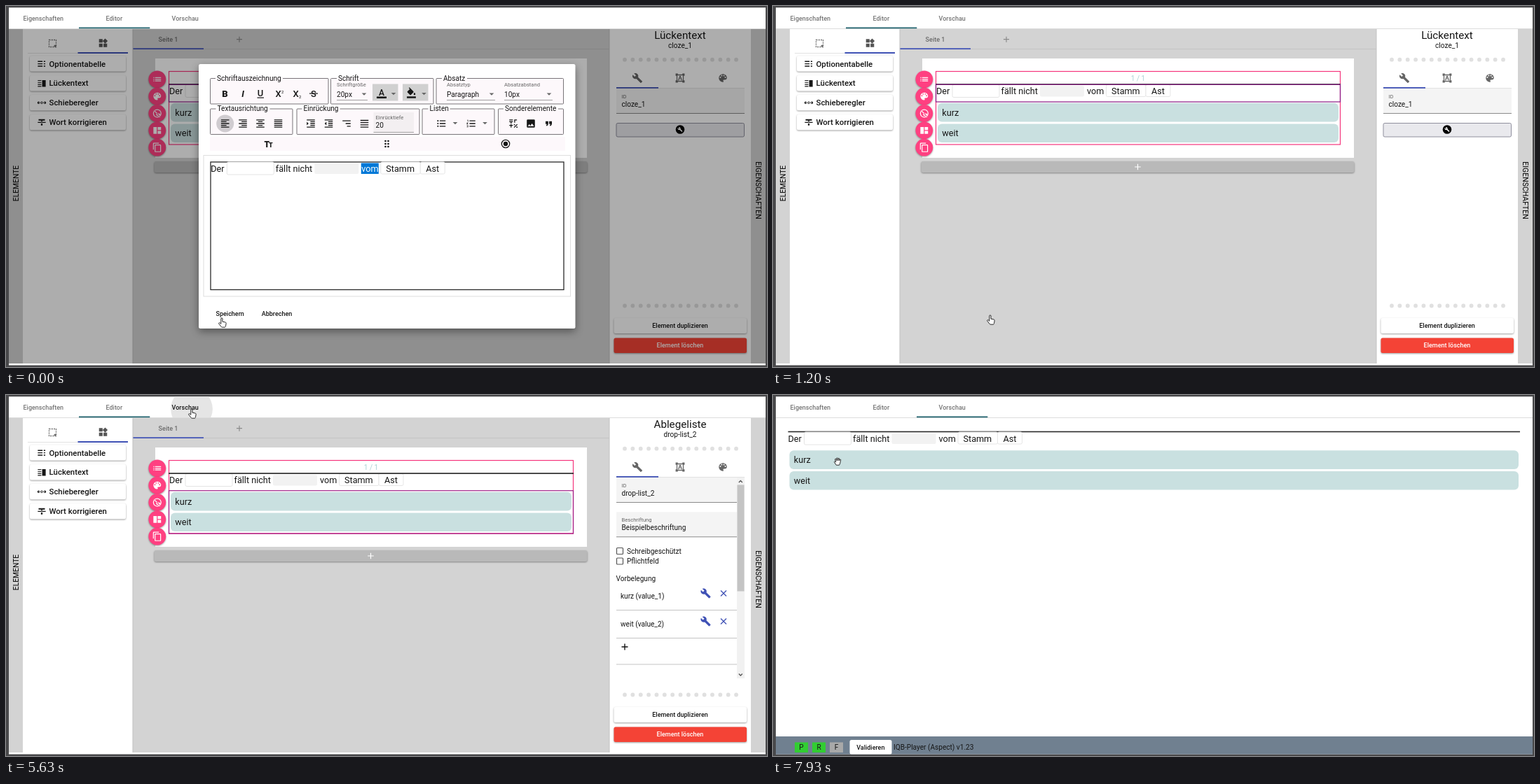
An HTML page that plays this animation: 1086x516 px, repeating every 8 s.

```html
<!DOCTYPE html>
<html lang="de">
<head>
<meta charset="utf-8">
<title>Editor</title>
<style>
html, body { margin: 0; width: 100%; height: 100%; overflow: hidden; background: #48484a; }
svg { display: block; width: 1086px; height: 516px; font-family: Roboto, Arial, sans-serif; }
.soft { filter: drop-shadow(0 1px 1px rgba(0,0,0,.38)); }
.deep { filter: drop-shadow(0 4px 6px rgba(0,0,0,.42)); }
</style>
</head>
<body>
<svg id="stage" viewBox="0 0 1086 516" xmlns="http://www.w3.org/2000/svg"></svg>
<script>
const BLUE = '#3f51b5', PINK = '#ff4081', INK = '#161616', GREY = '#707070';

// ---- drawing helpers ----
const rect = (x, y, x2, y2, fill, extra = '') =>
  `<rect x="${x}" y="${y}" width="${x2 - x}" height="${y2 - y}" fill="${fill}" ${extra}/>`;
const box = (x, y, x2, y2, stroke, width = 1, fill = 'none', r = 0) =>
  rect(x, y, x2, y2, fill, `stroke="${stroke}" stroke-width="${width}" rx="${r}"`);
const text = (x, y, str, size = 10.1, fill = INK, extra = '') =>
  `<text x="${x}" y="${y}" font-size="${size}" fill="${fill}" ${extra}>${str}</text>`;
const MID = 'text-anchor="middle"', BOLD = 'font-weight="500"';
const label = (x, y, str, size = 9, fill = INK, extra = '') =>
  text(x, y, str, size, fill, `${MID} ${BOLD} ${extra}`);
const icon = (x, y, d, fill = INK, size = 15.4) =>
  `<path transform="translate(${x - size / 2} ${y - size / 2}) scale(${size / 24})" d="${d}" fill="${fill}" fill-rule="evenodd"/>`;
const stroke = (d, color = INK, width = 1.2, extra = '') =>
  `<path d="${d}" fill="none" stroke="${color}" stroke-width="${width}" ${extra}/>`;
const dot = (x, y, r, fill, extra = '') => `<circle cx="${x}" cy="${y}" r="${r}" fill="${fill}" ${extra}/>`;
const group = (id, body, extra = '') => `<g id="${id}" ${extra}>${body}</g>`;
const plus = (x, y, r, color, w = 1.2) => stroke(`M${x - r} ${y}h${2 * r}M${x} ${y - r}v${2 * r}`, color, w);
const cross = (x, y, r) => stroke(`M${x - r} ${y - r}l${2 * r} ${2 * r}m0 ${-2 * r}l${-2 * r} ${2 * r}`, BLUE, 1.3);
const arrow = (x, y) => `<path d="M${x - 3.3} ${y - 1.6}h6.6l-3.3 3.4z" fill="#666"/>`;
const bars = rows => rows.map(([x, w], i) => `M${x} ${3 + i * 4}h${w}v2h${-w}z`).join('');

const disc = (x, y, r) => `M${x - r} ${y}a${r} ${r} 0 1 0 ${2 * r} 0a${r} ${r} 0 1 0 ${-2 * r} 0z`;
const FULL = [3, 18];
const shape = {
  wrench: 'M22.7 19l-9.1-9.1c.9-2.3.4-5-1.5-6.9-2-2-5-2.4-7.4-1.3L9 6 6 9 1.6 4.7C.4 7.1.9 10.1 2.9 12.1c1.9 1.9 4.6 2.4 6.9 1.5l9.1 9.1c.4.4 1 .4 1.4 0l2.3-2.3c.5-.4.5-1.1.1-1.4z',
  palette: 'M12 3a9 9 0 0 0 0 18c1.4 0 2-1.5 1.1-2.5-.9-1-.2-2.5 1.1-2.5H16a5 5 0 0 0 5-5c0-4.4-4-8-9-8z'
    + disc(6.5, 10.5, 1.5) + disc(9.5, 6.5, 1.5) + disc(14.5, 6.5, 1.5) + disc(17.5, 10.5, 1.5),
  list: 'M3 9h2V7H3zm0 4h2v-2H3zm0 4h2v-2H3zM7 7v2h14V7zm0 6h14v-2H7zm0 4h14v-2H7z',
  copy: 'M16 1H4a2 2 0 0 0-2 2v14h2V3h12zm3 4H8a2 2 0 0 0-2 2v14a2 2 0 0 0 2 2h11a2 2 0 0 0 2-2V7a2 2 0 0 0-2-2zm0 16H8V7h11z',
  layout: 'M3 4h8v16H3zM13 4h8v7h-8zM13 13h8v7h-8z',
  hidden: disc(12, 12, 10) + disc(12, 12, 8) + 'M5 4l15 15-1.5 1.5L3.500 5.500zM9 15c1-4 9-4 11 0-2 4-10 4-11 0z',
  widgets: 'M13 13v8h8v-8zM3 21h8v-8H3zM3 3v8h8V3zm13.700-1.300L11 7.300 16.700 13l5.600-5.700z',
  options: 'M2 5h12v2.500H2zM2 11h12v2.500H2zM2 17h12v2.500H2zM17 5h4v2.500h-4zM17 11h4v2.500h-4zM17 17h4v2.500h-4z',
  cloze: 'M2 4h9v2H2zM2 9h9v2H2zM2 14h9v2H2zM2 19h9v2H2zM13 4h9v17h-9z',
  slider: disc(4, 12, 3) + disc(12, 12, 3) + disc(20, 12, 3) + 'M4 11h16v2H4z',
  word: 'M4 4h16v3.500H4zM2 11h20v2.500H2zM10 7h4v3h-4zM10 15h4v5h-4z',
  frame: 'M2 2h5v2h10V2h5v5h-2v10h2v5h-5v-2H7v2H2v-5h2V7H2zM6 6v12h12V6zM11 7h2l4 10h-2l-1-2.500h-4L9 17H7zM10.700 13h2.600L12 9.500z',
  left: bars([FULL, [3, 12], FULL, [3, 12], FULL]),
  right: bars([FULL, [9, 12], FULL, [9, 12], FULL]),
  center: bars([FULL, [7, 10], FULL, [7, 10], FULL]),
  justify: bars([FULL, FULL, FULL, FULL, FULL]),
  indent: bars([FULL, [11, 10], [11, 10], [11, 10], FULL]) + 'M3 8v8l4-4z',
  outdent: bars([FULL, [11, 10], [11, 10], [11, 10], FULL]) + 'M7 8v8l-4-4z',
  hanging: 'M3 5h18v2H3zM10 11h11v2H10zM13 17h8v2h-8z',
  even: 'M3 4h18v2H3zM3 9h18v2H3zM3 14h18v2H3zM3 19h18v2H3z',
  bullets: disc(4, 6, 1.600) + disc(4, 12, 1.600) + disc(4, 18, 1.600) + 'M8 5h13v2H8zM8 11h13v2H8zM8 17h13v2H8z',
  numbers: 'M3 4h2v4H4V5H3zM2 10h3v1l-2 2h2v1H2zM2 16h3v4H2v-1h2v-2H2zM8 5h13v2H8zM8 11h13v2H8zM8 17h13v2H8z',
  symbols: 'M3 3h8v2H3zM3 7h8v2H8v3H6V9H3zM14 3h6v2h-4v5h-2zM20 13l1.500 1.500-7 7L13 20zM3 15h3v-2h2v2h3v2H8v4H6v-4H3z' + disc(14.500, 14.500, 1.500) + disc(20, 20, 1.500),
  image: 'M5 3h14a2 2 0 0 1 2 2v14a2 2 0 0 1-2 2H5a2 2 0 0 1-2-2V5a2 2 0 0 1 2-2zm3.500 10.500L5 18h14l-4.500-6-3.500 4.500z',
  quote: 'M6 17h3l2-4V7H5v6h3zm8 0h3l2-4V7h-6v6h3z',
  bucket: 'M16.500 9L7.600 0 6.200 1.400l2.400 2.400L3.400 9c-.6.600-.6 1.500 0 2.100l5.500 5.500c.600.600 1.500.600 2.100 0l5.500-5.500c.600-.600.600-1.500 0-2.100zM19 11.500s-2 2.200-2 3.500a2 2 0 0 0 4 0c0-1.300-2-3.500-2-3.500zM2 20h20v4H2z'
};

// ---- repeated parts ----
const sentence = (dx, dy, selected) => `<g transform="translate(${dx} ${dy})">`
  + box(256, 112.5, 323, 130.5, '#e4e4e4', 1, '#fff', 2) + rect(381, 114, 444, 129.5, '#f2f2f2', 'rx="2"')
  + box(475.5, 112.5, 532, 129.5, '#e6e6e6', 1, '#fff', 2) + box(532, 112.5, 567, 129.5, '#e6e6e6', 1, '#fff', 2)
  + (selected ? rect(447.5, 114, 472.5, 129.5, '#0078d7') : '')
  + text(233, 126, 'Der', 12.65) + text(325.5, 126, 'fällt nicht', 12.65)
  + text(448, 126, 'vom', 12.65, selected ? '#fff' : INK)
  + text(483, 126, 'Stamm', 12.65) + text(540, 126, 'Ast', 12.65) + '</g>';

const words = (x, x2, y) => ['kurz', 'weit'].map((w, i) =>
  rect(x, y + i * 29.6, x2, y + 26.7 + i * 29.6, '#c9e0e0', 'rx="6"') + text(x + 6.3, y + 17.7 + i * 29.6, w, 12.65)).join('');

const dots = y => Array.from({ length: 15 }, (_, i) => dot(883 + i * 11.36, y, 2.9, '#e0e0e0')).join('');

const field = (y, x2, name, value) => rect(871, y, x2, y + 35.5, '#f4f4f4') + rect(871, y + 35, x2, y + 36, '#8a8a8a')
  + text(878.5, y + 13.5, name, 7.6, '#666') + text(878.5, y + 26, value);

const check = (y, name) => box(871.5, y - 4.5, 880.5, y + 4.5, '#555', 1.2, '#fff', 1) + text(886, y + 3.6, name);

const entry = (y, name) => text(877, y + 4, name) + icon(998.5, y - 3.5, shape.wrench, BLUE) + cross(1024, y - 3.5, 4)
  + rect(871, y + 20, 1043, y + 21, '#c4c4c4');

const fieldset = (x, x2, y, name, width, lx) => box(x, y, x2, y + 36.5, '#6a666a', .9, '#fdf8fb', 1)
  + rect(lx - 2, y - 2, lx + width + 2, y + 2, '#fefbfd') + text(lx, y + 3.2, name);

const select = (x, x2, name, value) => text(x, 115, name, 7.6, '#666') + text(x, 130, value)
  + arrow(x2 - 5, 126) + rect(x, 134, x2, 134.8, '#8a8a8a');

// ---- scenes ----
const leftPanel = rect(24, 33, 181, 511, '#fff')
  + rect(31, 67, 174, 68, '#e2e2e2') + rect(102.500, 66, 174, 68, BLUE)
  + stroke('M61.500 48.500h10v10h-10z', GREY, 1.300, 'stroke-dasharray="2 1.300"') + dot(70, 57, 1.600, GREY)
  + icon(138.500, 53, shape.widgets, '#555')
  + [['Optionentabelle', 'options'], ['Lückentext', 'cloze'], ['Schieberegler', 'slider'], ['Wort korrigieren', 'word']].map(([name, ic], i) => {
    const y = 82.5 + i * 27.9;
    return rect(34, y - 11.300, 171, y + 11, '#fff', 'rx="2.500" class="soft"') + icon(51, y, shape[ic], INK, 13.500)
      + text(61.500, y + 4, name, 11.400, INK, BOLD);
  }).join('');

const canvasArea = rect(181, 33, 861, 511, '#d3d3d3') + rect(181, 61, 861, 62, '#c4c4c4') + rect(181, 60.3, 282, 62, BLUE)
  + label(231.5, 50.5, 'Seite 1', 9, '#6a6a6a') + plus(333, 47.700, 4, '#8a8a8a')
  + rect(213, 75, 829, 217, '#fff')
  + rect(211.500, 222, 829.500, 238, '#b9b9b9', 'rx="3" class="soft"') + plus(520.500, 230, 4.300, '#fff')
  + label(521, 106.500, '1 / 1', 10.100, '#a9d0d4', 'style="font-weight:400"')
  + sentence(0, 0) + words(235, 807, 138.8)
  + box(232.5, 93.5, 809.5, 198, '#f5357c', 1.2) + rect(232, 111.3, 810, 112.8, '#111')
  + group('pickText', box(232.500, 112.300, 809.500, 137, '#8a1a86', 1.200))
  + group('pickList', box(232.500, 136.700, 809.500, 198, '#a01f88', 1.200))
  + ['list', 'palette', 'hidden', 'layout', 'copy'].map((name, i) =>
    dot(215.800, 104.800 + i * 24.350, 12.400, PINK, 'class="soft"') + icon(215.800, 104.800 + i * 24.350, shape[name], '#fff', 14.500)).join('');

const panelText = label(962, 47, 'Lückentext', 15.200, INK, 'style="font-weight:400"') + text(962, 59.500, 'cloze_1', 10.100, INK, MID)
  + field(118, 1054, 'ID', 'cloze_1') + box(871, 167.500, 1053.500, 187, '#8f8f9d', 1, '#e9e9ed', 2)
  + dot(962, 176.500, 6.300, '#000') + icon(962, 176.500, shape.wrench, '#fff', 7.500);

const panelList = label(962, 47, 'Ablegeliste', 15.200, INK, 'style="font-weight:400"') + text(962, 59.500, 'drop-list_2', 10.100, INK, MID)
  + field(118, 1043, 'ID', 'drop-list_2') + field(167.3, 1043, 'Beschriftung', 'Beispielbeschriftung')
  + check(223, 'Schreibgeschützt') + check(237.500, 'Pflichtfeld') + text(870.500, 266, 'Vorbelegung')
  + entry(287, 'kurz (value_1)') + entry(327, 'weit (value_2)') + plus(883, 360, 4.500, INK, 1.400)
  + rect(871, 384.5, 1043, 385.5, '#c4c4c4')
  + rect(1043, 118, 1054, 405, '#f1f1f1') + rect(1043.500, 128.500, 1053.500, 280.500, '#c4c4c4')
  + stroke('M1045.800 125l2.500-2.500 2.500 2.500M1045.800 398.500l2.500 2.500 2.500-2.500', '#555', 1.300);

const rightPanel = rect(861, 33, 1063, 511, '#fff') + dots(76.7) + dots(428.5)
  + icon(901, 103, shape.wrench, '#666') + icon(962, 103, shape.frame, '#666') + icon(1023, 103, shape.palette, '#666')
  + rect(871, 117, 1054, 118, '#e2e2e2')
  + group('panelText', panelText) + group('panelList', panelList) + rect(871, 116, 931, 117.800, BLUE)
  + rect(867.500, 446, 1057, 468, '#fff', 'rx="2.500" class="soft"') + label(962, 460.300, 'Element duplizieren')
  + rect(867.500, 474.500, 1057, 496, '#f44336', 'rx="2.500" class="soft"') + label(962, 488.300, 'Element löschen', 9, '#fff');

const editor = rect(4, 33, 1084, 511, '#d3d3d3')
  + canvasArea + leftPanel + rightPanel
  + rect(180.500, 33, 181.500, 511, '#c2c2c2') + rect(860.500, 33, 861.500, 511, '#c2c2c2')
  + text(0, 0, 'ELEMENTE', 10.300, '#000', `${MID} transform="translate(17.500 253.500) rotate(-90)"`)
  + text(0, 0, 'EIGENSCHAFTEN', 10.500, '#000', `${MID} transform="translate(1070 263.500) rotate(90)"`);

const glyph = (x, y, str, extra) => text(x, y, str, 13, INK, `${MID} ${extra}`);
const dialog = rect(275, 83, 812.500, 461, '#fff', 'rx="2.500" class="deep"')
  + fieldset(291.5, 460, 103.500, 'Schriftauszeichnung', 92, 301) + fieldset(463.500, 610, 103.500, 'Schrift', 29, 474)
  + fieldset(614, 795.500, 103.500, 'Absatz', 32, 624)
  + fieldset(291.5, 409, 147, 'Textausrichtung', 73, 301.5) + fieldset(415, 590, 147, 'Einrückung', 50, 424.500)
  + fieldset(594, 697, 147, 'Listen', 27, 604.500) + fieldset(702.500, 795.500, 147, 'Sonderelemente', 74, 712)
  + glyph(312.500, 129.500, 'B', 'font-weight="800"') + glyph(338, 129.500, 'I', 'font-weight="700" font-style="italic"')
  + glyph(363, 128.500, 'U', BOLD) + rect(358.500, 130.500, 368, 131.700, INK)
  + glyph(388.500, 129.500, 'X', BOLD) + text(393, 125, '2', 6) + glyph(413.500, 129.500, 'X', BOLD) + text(418, 131.500, '2', 6)
  + glyph(439, 129.500, 'S', BOLD) + rect(433, 124.500, 445, 125.700, INK)
  + select(472, 516, 'Schriftgröße', '20px') + select(629, 698, 'Absatztyp', 'Paragraph') + select(711, 780, 'Absatzabstand', '10px')
  + rect(523, 111.500, 559.500, 135.500, '#d0d0d0') + rect(566, 111.500, 602.500, 135.500, '#d0d0d0')
  + label(536, 127.500, 'A', 12) + rect(529, 129.500, 543, 132, '#000') + arrow(553, 125.500)
  + icon(578.500, 124, shape.bucket) + arrow(596.500, 125.500)
  + dot(312.700, 168, 12.500, '#d0ccd0')
  + [['left', 312.700], ['right', 338], ['center', 363], ['justify', 388.500], ['indent', 435], ['outdent', 460.500], ['hanging', 486],
    ['even', 511.500], ['bullets', 621.500], ['numbers', 664], ['symbols', 724], ['image', 749], ['quote', 774.500]]
    .map(([name, x]) => icon(x, 168, shape[name])).join('')
  + arrow(641, 167.500) + arrow(683.500, 167.500)
  + rect(524.500, 152, 582, 180, '#f3eff1') + rect(524.500, 180, 582, 180.800, '#8a8a8a')
  + text(527.500, 161.700, 'Einrücktiefe', 7.600, '#666') + text(527.500, 174, '20')
  + rect(291, 187, 798, 207, '#fdf8fb')
  + text(368.500, 201.500, 'T', 12, INK, 'font-weight="800"') + text(375, 201.500, 'T', 9, INK, 'font-weight="800"')
  + [0, 1, 2].map(i => dot(541.500, 193 + i * 4, 1.300, INK) + dot(545.500, 193 + i * 4, 1.300, INK)).join('')
  + dot(713, 197, 5.700, 'none', `stroke="${INK}" stroke-width="1.300"`) + dot(713, 197, 3.200, INK)
  + box(282, 213.500, 805.500, 415, '#dedede') + box(292, 223, 796, 405.500, '#2a2a2a', 1.300)
  + sentence(59.3, 110.5, true)
  + label(319.700, 443, 'Speichern') + label(386.500, 443, 'Abbrechen');

const flag = (name, x) => `<rect id="flag${name}" x="${x}" y="496.500" width="19" height="14.500"/>` + text(x + 9.500, 507.300, name, 10.100, INK, MID);
const preview = rect(4, 33, 1084, 513, '#fff')
  + group('task', rect(21.500, 51.700, 1066, 53.300, '#2a2a2a') + sentence(-211.5, -59.5) + words(23.5, 1064, 79.300))
  + rect(4, 488, 1084, 513.500, '#708090') + flag('P', 31) + flag('R', 56) + flag('F', 81)
  + '<rect id="validate" x="109.500" y="493" width="60" height="20.500" rx="2.500"/>' + label(139.300, 507, 'Validieren')
  + text(172, 507, 'IQB-Player (Aspect) v1.23');

const topBar = rect(4, 2.500, 1084, 33, '#fff') + rect(4, 32, 1084, 33, '#dcdcdc')
  + '<clipPath id="tabClip"><rect x="205" y="2.500" width="101.500" height="29.500"/></clipPath>'
  + dot(265, 20, 0, '#e5e5e5', 'id="ripple" clip-path="url(#tabClip)"')
  + label(53.300, 20.500, 'Eigenschaften', 9, '#757575') + label(154.300, 20.500, 'Editor', 9, '#757575')
  + label(255.700, 20.500, 'Vorschau', 9, '#757575', 'id="tabPreview"')
  + '<rect id="inkBar" y="30.500" width="101.300" height="1.700" fill="#1b5f6b"/>';

const line = 'fill="#fff" stroke="#111" stroke-width=".9" stroke-linejoin="round"';
const cursor = group('arrow', `<path d="M0 0v10.500l2.400-2.200 1.600 3.500 1.700-.7-1.600-3.500h3.300z" ${line}/>`)
  + group('pointer', `<path d="M-1.200 1c0-1.500 2.200-1.500 2.200 0v4.200l4 .8c1 .3 1.200 1 1.100 2l-.6 3.500c-.1 1-.6 1.700-1.500 1.700H.700c-.7 0-1.200-.3-1.600-.8l-3.300-4.200c-.7-1 .6-2 1.500-1.200l1.500 1.300z" ${line}/>`)
  + group('open', `<path d="M-2 5.200l-2.700-4c-.6-1 .6-1.700 1.300-1l.9.800-1.200-3.700c-.3-1.200 1.100-1.500 1.500-.4l.7 1.900-.1-3c0-1.200 1.500-1.200 1.600 0l.2 2.800.6-2.600c.2-1.100 1.600-.8 1.500.3l-.3 2.700.9-1.600c.6-1 1.700-.4 1.400.6-.6 2.400-.6 5-2 7.200z" ${line}/>`)
  + group('closed', `<path d="M-2 4.200L-4 1.300c-.4-1 .2-1.700 1-1.700v-2.300c.3-1 1.500-1 1.900-.2.300-.9 1.500-.9 1.900 0 .4-.8 1.500-.7 1.800.2.500-.6 1.500-.3 1.600.6.200 2.500-.3 4.600-1.400 6.300z" ${line}/>`);

document.getElementById('stage').innerHTML = rect(0, 0, 1086, 516, '#48484a') + rect(4, 2.500, 1084, 513.500, '#fff')
  + group('editor', editor) + group('preview', preview) + topBar
  + rect(4, 33, 1084, 511, '#000', 'id="shade"') + group('dialog', dialog) + group('cursor', cursor);

// ---- animation ----
const $ = id => document.getElementById(id);
const show = (id, on) => $(id).setAttribute('display', on ? 'inline' : 'none');
const set = (id, name, value) => $(id).setAttribute(name, value);
const span = (t, a, b) => Math.min(1, Math.max(0, (t - a) / (b - a)));
const smooth = u => u * u * (3 - 2 * u);

// start time, end time, target, optional bend point
const moves = [
  [60, 360, 310, 442],
  [1530, 2230, 352, 175, 318, 300],
  [2870, 2871, 1058, 192],
  [3060, 3480, 929, 41, 1010, 95],
  [3480, 3760, 967, 75],
  [4030, 4830, 294, 84, 670, 400],
  [4860, 5200, 265, 20],
  [5700, 6100, 377, 167, 320, 90],
  [6180, 6430, 381, 172],
  [6600, 7060, 92.5, 100, 240, 150],
  [7890, 7930, 92.3, 95]
];

function pointerAt(t) {
  let x = 308, y = 446;
  for (const [a, b, x2, y2, bx = (x + x2) / 2, by = (y + y2) / 2] of moves) {
    if (t < a) break;
    const u = smooth(span(t, a, b)), v = 1 - u;
    x = v * v * x + 2 * u * v * bx + u * u * x2;
    y = v * v * y + 2 * u * v * by + u * u * y2;
  }
  return [x, y];
}

function cursorKind(t, y) {
  if (t < 1560 || (t > 5100 && t < 5760)) return 'pointer';
  if (t < 2400) return y < 197 ? 'open' : 'arrow';
  if (t < 2870) return 'closed';
  return t > 6600 && y < 136 ? 'open' : 'arrow';
}

function draw(t) {
  const inPreview = t >= 5830, ready = t >= 6170, listPicked = t >= 2600;
  show('editor', !inPreview);
  show('preview', inPreview);
  show('task', ready);
  show('pickText', !listPicked);
  show('panelText', !listPicked);
  show('pickList', listPicked);
  show('panelList', listPicked);

  const closing = span(t, 860, 1200);
  set('shade', 'opacity', .32 * (1 - closing));
  show('shade', closing < 1);
  const fade = 1 - span(t, 850, 930);
  set('dialog', 'opacity', fade);
  show('dialog', fade > 0);

  const ink = 1 - (1 - span(t, 5880, 6255)) ** 2;
  set('inkBar', 'x', 104 + 101 * ink);
  const settle = span(t, 6240, 6430);
  set('ripple', 'r', 75 * span(t, 5590, 5693));
  set('ripple', 'opacity', 1 - settle);
  set('tabPreview', 'fill', t > 5100 && t < 6300 ? INK : '#757575');
  for (const name of 'PRF') set('flag' + name, 'fill', ready && name !== 'F' ? '#32cd32' : '#a9a9a9');
  set('validate', 'fill', settle < 1 ? '#f5f2f8' : '#fff');

  const [x, y] = pointerAt(t), kind = cursorKind(t, y);
  set('cursor', 'transform', `translate(${x} ${y})`);
  for (const name of ['arrow', 'pointer', 'open', 'closed']) show(name, name === kind);
}

const begin = performance.now();
function tick() {
  draw((performance.now() - begin) % 8000);
  requestAnimationFrame(tick);
}
tick();
</script>
</body>
</html>
```
